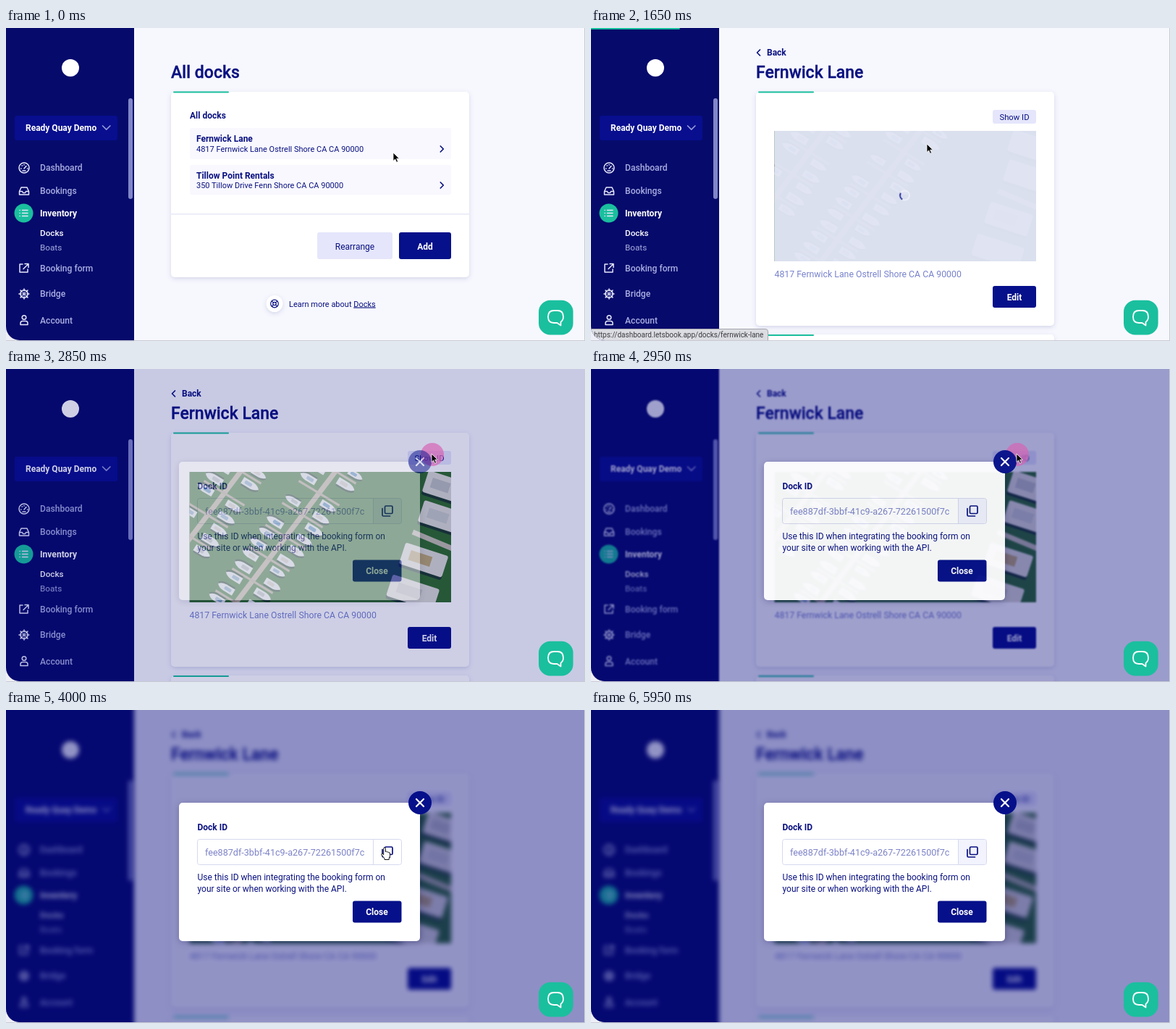
Animation of 800 by 432 pixels, one loop 6 s. Source, as an HTML page:

```html
<!DOCTYPE html>
<html lang="en">
<head>
<meta charset="utf-8">
<title>Dock ID</title>
<style>
html, body { margin: 0; width: 100%; height: 100%; overflow: hidden; background: #eeeff6; }
#stage { position: relative; width: 800px; height: 432px; overflow: hidden; }
#window { position: absolute; inset: 0 1px 1px 0; overflow: hidden; border-radius: 0 0 0 19px; background: #f7f8fe; }
svg { position: absolute; left: 0; top: 0; overflow: visible; }
#edge { position: absolute; inset: 0; box-shadow: inset -1px -1px #c9cad4; }
text { font: 400 12px Roboto, "Open Sans", sans-serif; fill: #0a1180; }
.b { font-weight: 700; }
.sm { font-size: 11px; }
.h1 { font-size: 23px; font-weight: 500; stroke: #0a1180; stroke-width: .35px; }
.mid { text-anchor: middle; }
.white { fill: #fff; }
.nav text { font-size: 12.1px; font-weight: 500; fill: #a9aee2; }
.nav .on { fill: #fff; font-weight: 700; }
.nav .sub { font-size: 11.7px; }
.nav .sub.off { font-weight: 400; }
.place { font-size: 12.3px; fill: #7883cd; }
.navy { fill: #06108a; }
.pale { fill: #e5e6fb; }
.green { fill: #1abf9e; }
.line { fill: none; stroke: #0a1180; stroke-width: 1.7; stroke-linecap: round; stroke-linejoin: round; }
.icon { fill: none; stroke: #e6e8fb; stroke-width: 1.5; stroke-linecap: round; stroke-linejoin: round; }
.card { fill: #fff; filter: drop-shadow(0 2px 3px rgba(30, 40, 120, .16)); }

.anim { animation: 6s linear infinite both; }
.cut { animation: 6s step-end infinite both; }
#page { animation-name: blur; }
#dim { animation-name: dim; }
#modal { animation-name: modal; }
#list { animation-name: list; }
#detail { animation-name: detail; }
#hover { animation-name: hover; }
#status { animation-name: status; }
#bar { animation-name: bar; transform-origin: 0 0; }
#cover { animation-name: cover; }
#spin { animation: spin .9s linear infinite; transform-origin: 433.5px 231px; }
#ring { animation-name: ring; }
#copy { animation-name: copy; }
#cursor { animation-name: move; }
#arrow { animation-name: arrow; }
#hand { animation-name: hand; }

@keyframes blur {
  0%, 45.8% { filter: blur(0); }
  49.17% { filter: blur(1.3px); }
  56%, 100% { filter: blur(3px); }
}
@keyframes dim { 0%, 45.8% { opacity: 0; } 49.17% { opacity: .88; } 53%, 100% { opacity: 1; } }
@keyframes modal { 0%, 45.8% { opacity: 0; } 49.17% { opacity: .95; } 51%, 100% { opacity: 1; } }
@keyframes list { 0% { visibility: visible; } 25%, 100% { visibility: hidden; } }
@keyframes detail { 0% { visibility: hidden; } 25%, 100% { visibility: visible; } }
@keyframes hover { 0%, 4.2% { opacity: 0; } 8%, 100% { opacity: 1; } }
@keyframes status { 0%, 8% { opacity: 0; } 10%, 32% { opacity: 1; } 34.1% { opacity: .1; } 35%, 100% { opacity: 0; } }
@keyframes bar {
  0%, 22.4% { transform: scaleX(0); opacity: 1; }
  27.5% { transform: scaleX(.1525); }
  30.5% { transform: scaleX(.3); }
  32.3% { transform: scaleX(1); opacity: 1; }
  33.6%, 100% { transform: scaleX(1); opacity: 0; }
}
@keyframes cover { 0%, 28.6% { opacity: 1; } 31.5%, 100% { opacity: 0; } }
@keyframes spin { to { transform: rotate(360deg); } }
@keyframes ring {
  0%, 20.6% { transform: translate(464px, 161px); opacity: 0; }
  21.2%, 23% { transform: translate(464px, 161px); opacity: .7; }
  25% { transform: translate(464px, 161px); opacity: 0; }
  25.01%, 44.8% { transform: translate(589px, 118px); opacity: 0; }
  45.5%, 49.2% { transform: translate(589px, 118px); opacity: .7; }
  52%, 100% { transform: translate(589px, 118px); opacity: 0; }
}
@keyframes copy { 0% { opacity: 1; } 60.8% { opacity: 0; } 77.5%, 100% { opacity: 1; } }
@keyframes move {
  0%, 2% { transform: translate(535px, 172px); animation-timing-function: ease-in-out; }
  11% { transform: translate(464px, 160px); }
  32% { transform: translate(464px, 160px); animation-timing-function: ease-in; }
  34.17% { transform: translate(499px, 163px); animation-timing-function: ease-out; }
  41.5%, 55% { transform: translate(588px, 117px); animation-timing-function: ease-in-out; }
  61.5%, 76.7% { transform: translate(523px, 190px); animation-timing-function: ease-in; }
  84.2%, 100% { transform: translate(610px, 445px); }
}
@keyframes arrow {
  0% { opacity: 1; } 5% { opacity: 0; } 25% { opacity: 1; }
  39.2% { opacity: 0; } 46.7% { opacity: 1; } 60.8% { opacity: 0; } 77.5%, 100% { opacity: 1; }
}
@keyframes hand {
  0% { opacity: 0; } 5% { opacity: 1; } 25% { opacity: 0; }
  39.2% { opacity: 1; } 46.7% { opacity: 0; } 60.8% { opacity: 1; } 77.5%, 100% { opacity: 0; }
}
</style>
</head>
<body>
<div id="stage">
  <div id="window">
    <svg id="page" class="anim" width="800" height="432">
      <rect x="-20" y="-20" width="840" height="472" fill="#f7f8fe"/>

      <rect x="-20" y="-20" width="197" height="472" fill="#060a6b"/>
      <circle cx="89" cy="55" r="12" fill="#fff"/>
      <rect x="12" y="121" width="142" height="34" rx="3" fill="#080e8e"/>
      <text class="b white" x="27" y="142">Ready Quay Demo</text>
      <path class="line" style="stroke:#9297d8" d="M133.5 135l5.2 5.2 5.2-5.2"/>
      <rect x="169" y="97" width="6" height="139" rx="3" fill="#8186c8"/>
      <g class="nav">
        <text x="47" y="197">Dashboard</text>
        <text x="47" y="229">Bookings</text>
        <text class="on" x="47" y="260">Inventory</text>
        <text class="sub white" style="fill:#fff" x="47" y="286.5">Docks</text>
        <text class="sub off" x="47" y="307">Boats</text>
        <text x="47" y="335.5">Booking form</text>
        <text x="47" y="371">Bridge</text>
        <text x="47" y="407.5">Account</text>
      </g>
      <circle class="green" cx="24.5" cy="255.5" r="13"/>
      <g class="icon">
        <circle cx="25" cy="193" r="7"/>
        <path d="M25 194l3-3.500M20.5 194h.5M22 190h.5M25 188.5v.5M29.5 194h.5M23 197h4"/>
        <path d="M18.500 225.500l2.500-5.500h8l2.500 5.500v4.500h-13zh4l1 2h3l1-2h4"/>
        <path d="M22.5 251.5H30M22.5 255.5H30M22.5 259.5H30M19 251.5h.2M19 255.5h.2M19 259.5h.2"/>
        <path d="M23 326h-4v11h11v-4M26 325.5h5v5M31 325.5l-7 7"/>
        <circle cx="25" cy="367" r="5.2"/><circle cx="25" cy="367" r="1.5"/>
        <path stroke-dasharray="3.2 7.600" d="M25 359.9v14.200M17.9 367h14.200M20 362l10 10M30 362l-10 10"/>
        <circle cx="25" cy="399.5" r="2.8"/>
        <path d="M20 409.500v-2q0-3 3-3h4q3 0 3 3v2z"/>
      </g>

      <g id="list" class="cut">
        <text class="h1" x="228" y="69">All docks</text>
        <rect class="card" x="228" y="88" width="412" height="256" rx="5"/>
        <rect class="green" x="231" y="87.5" width="77" height="2" rx="1"/>
        <text class="b" x="254" y="125">All docks</text>
        <rect x="254" y="138" width="361" height="43" rx="3" fill="#f8f8fe"/>
        <rect id="hover" class="anim pale" x="254" y="138" width="361" height="43" rx="3"/>
        <rect x="254" y="189" width="361" height="41" rx="3" fill="#f8f8fe"/>
        <text class="b" x="263" y="157">Fernwick Lane</text>
        <text class="sm" x="263" y="170.5">4817 Fernwick Lane Ostrell Shore CA CA 90000</text>
        <text class="b" x="263" y="207.5">Tillow Point Rentals</text>
        <text class="sm" x="263" y="221">350 Tillow Drive Fenn Shore CA CA 90000</text>
        <path class="line" d="M600.3 163l4 4-4 4M600.3 213l4 4-4 4"/>
        <rect x="228" y="256.3" width="412" height="1.2" fill="#e2e3f6"/>
        <rect class="pale" x="430" y="282" width="104" height="37" rx="3"/>
        <text class="mid" x="482" y="305.5">Rearrange</text>
        <rect class="navy" x="543" y="282" width="72" height="37" rx="3"/>
        <text class="b mid white" x="579" y="305.5">Add</text>
        <circle cx="371" cy="380.5" r="11.5" class="card"/>
        <g class="line" style="stroke-width:1.2">
          <circle cx="371" cy="380.5" r="5.3"/><circle cx="371" cy="380.5" r="2.2"/>
          <path d="M367.3 376.8l2.1 2.1M374.7 376.8l-2.1 2.1M367.3 384.2l2.1-2.1M374.7 384.2l-2.1-2.1"/>
        </g>
        <text class="sm" x="391" y="384.5">Learn more about <tspan text-decoration="underline">Docks</tspan></text>
      </g>

      <g id="detail" class="cut">
        <path class="line" d="M233.5 30l-4 4 4 4"/>
        <text class="b" x="243" y="38">Back</text>
        <text class="h1" x="228" y="69">Fernwick Lane</text>
        <rect class="card" x="228" y="88" width="412" height="323" rx="5"/>
        <rect class="green" x="231" y="87.5" width="77" height="2" rx="1"/>
        <rect class="card" x="228" y="423" width="412" height="40" rx="5"/>
        <rect class="green" x="231" y="423" width="77" height="2" rx="1"/>
        <rect class="pale" x="555" y="113" width="60" height="19" rx="3"/>
        <text class="mid" style="font-size:11.3px" x="585" y="126.5">Show ID</text>
        <clipPath id="frame"><rect x="253.5" y="142" width="361.5" height="180"/></clipPath>
        <g id="photo" clip-path="url(#frame)"></g>
        <g id="cover" class="anim">
          <rect x="253.5" y="142" width="361.5" height="180" fill="#e0e4f3" opacity=".975"/>
          <circle cx="433.5" cy="231" r="6.5" fill="none" stroke="#eceefa" stroke-width="2"/>
          <path id="spin" d="M427 231a6.5 6.5 0 0 1 6.500-6.500" fill="none" stroke="#2c35a0" stroke-width="2"/>
        </g>
        <text class="place" x="253.5" y="343.5">4817 Fernwick Lane Ostrell Shore CA CA 90000</text>
        <rect class="navy" x="555" y="356" width="60" height="30" rx="3"/>
        <text class="b mid white" x="585" y="375.5">Edit</text>
      </g>
      <rect id="bar" class="anim green" width="800" height="2"/>
    </svg>

    <svg width="800" height="432">
      <g id="status" class="anim">
        <path d="M-1 415.5h242q3.5 0 3.5 3.500v14h-245.500z" fill="#dcdde2" stroke="#a5a6ae"/>
        <text x="4" y="427" style="font-size:10px;fill:#3b3b40">https://dashboard.letsbook.app/docks/fernwick-lane</text>
      </g>
      <rect id="dim" class="anim" width="800" height="432" fill="rgba(4,6,122,.43)"/>
    </svg>
  </div>
  <div id="edge"></div>

  <svg width="800" height="432">
    <circle id="ring" class="anim" r="16" fill="#d765b5"/>
    <g id="modal" class="anim">
      <rect x="239" y="128" width="333" height="191" rx="5" fill="#fff" style="filter:drop-shadow(0 2px 5px rgba(0,0,70,.25))"/>
      <circle class="navy" cx="572" cy="128" r="16"/>
      <path class="line" style="stroke:#fff;stroke-width:2.2" d="M567 123l10 10M577 123l-10 10"/>
      <text class="b" x="264.5" y="165.5">Dock ID</text>
      <path id="copy" class="cut" d="M508 179h35q3 0 3 3v28q0 3-3 3h-35z" fill="#f2f3fd"/>
      <rect x="264.5" y="178.5" width="282" height="35" rx="3" fill="none" stroke="#d6d9ef"/>
      <path d="M507.5 179v34" stroke="#d6d9ef"/>
      <text x="275" y="200.5" style="font-size:12.6px;fill:#7d83c8">fee887df-3bbf-41c9-a267-72261500f7c</text>
      <g class="line">
        <rect x="523.5" y="189" width="10.5" height="10.5" rx="1.5"/>
        <path d="M520 192.5v9q0 1.5 1.5 1.5h9"/>
      </g>
      <text x="264.5" y="235">Use this ID when integrating the booking form on</text>
      <text x="264.5" y="251">your site or when working with the API.</text>
      <rect class="navy" x="479" y="263.5" width="67.5" height="30" rx="3"/>
      <text class="b mid white" x="512.5" y="283">Close</text>
    </g>

    <rect class="green" x="736" y="375.8" width="47.6" height="47.6" rx="16"/>
    <path d="M757 390h5q8 0 8 8.500 0 5-3.500 7.200v4.800l-5-3.500h-4.500q-8 0-8-8.500t8-8.500z" fill="none" stroke="#fff" stroke-width="1.8" stroke-linejoin="round"/>

    <g id="cursor" class="anim">
      <path id="arrow" class="cut" d="M0 0v11.500l2.700-2.500 1.900 4.300 2-.9-1.900-4.200h3.700z" fill="#000" stroke="#fff" stroke-width=".8"/>
      <path id="hand" class="cut" d="M-1.300 1.300q0-1.500 1.300-1.500t1.300 1.500v4.200q1.700-.8 2.300.5 1.600-.6 2.100.6 1.700-.3 1.800 1.400v3.500l-1.300 3.500v1.500h-6.200v-1.500l-4-5q-.8-1.500.6-1.800 1-.1 2.100 1.600z" fill="#fff" stroke="#111" stroke-width="1" stroke-linejoin="round"/>
    </g>
  </svg>
</div>
<script>
const photo = document.getElementById('photo');
let seed = 11;
const rand = () => (seed = (seed * 16807) % 2147483647) / 2147483647;
const pick = list => list[Math.floor(rand() * list.length)];

function add(tag, attrs) {
  const el = document.createElementNS('http://www.w3.org/2000/svg', tag);
  for (const key in attrs) el.setAttribute(key, attrs[key]);
  photo.append(el);
}

function boat(x, y, angle, size) {
  const transform = `translate(${x} ${y}) rotate(${angle}) scale(${size})`;
  const hull = 'M-12-5H3Q10-4.5 14 0 10 4.5 3 5H-12Z';
  add('path', { d: hull, transform: transform + ' translate(1 2.5)', fill: '#183a20' });
  add('path', { d: hull, transform, fill: '#dfe4e2' });
  add('rect', { x: -8, y: -2.5, width: 11, height: 5, rx: 1.5, transform,
    fill: pick(['#7fa5bd', '#a9b3b0', '#4d87b4', '#c9c6b8']) });
}

// A walkway running down-left, with a finger after every second berth.
function pier(x, y, count) {
  const dx = -.605, dy = .796, gap = 19;
  add('path', { d: `M${x} ${y}l${dx * count * gap} ${dy * count * gap}`, stroke: '#b3a890', 'stroke-width': 7 });
  for (let i = 0; i < count; i++) {
    const px = x + dx * i * gap, py = y + dy * i * gap;
    if (i % 2) add('path', { d: `M${px - 28} ${py - 17}l56 34`, stroke: '#a99f88', 'stroke-width': 3 });
    for (const side of [-1, 1]) {
      if (rand() < .12) continue;
      const out = side * (20 + rand() * 5);
      boat(px + out * .85 + dx * 9, py + out * .53 + dy * 9, side < 0 ? 211 : 31, .85 + rand() * .2);
    }
  }
}

// A large boat with a shaded cabin.
function yacht(x, y, width, cabin) {
  const transform = `translate(${x} ${y}) rotate(18)`;
  add('rect', { x: -width / 2, y: -13, width, height: 32, rx: 3, fill: '#1d3a2a', transform });
  add('rect', { x: -width / 2, y: -16, width, height: 31, rx: 3, fill: '#d9d8d0', transform });
  add('rect', { x: -width / 3, y: -8, width: width / 2, height: 14, fill: cabin, transform });
}

add('rect', { x: 253, y: 142, width: 362, height: 180, fill: '#2f6b28' });
pier(336, 126, 8);
pier(467, 126, 14);
add('path', { d: 'M562 225l55 23', stroke: '#c0bbaa', 'stroke-width': 7 });
yacht(604, 163, 52, '#b9bdbb');
yacht(601, 205, 58, '#c5c8c5');
yacht(577, 264, 62, '#b8a56f');
yacht(562, 309, 68, '#c2c3bd');
</script>
</body>
</html>
```
